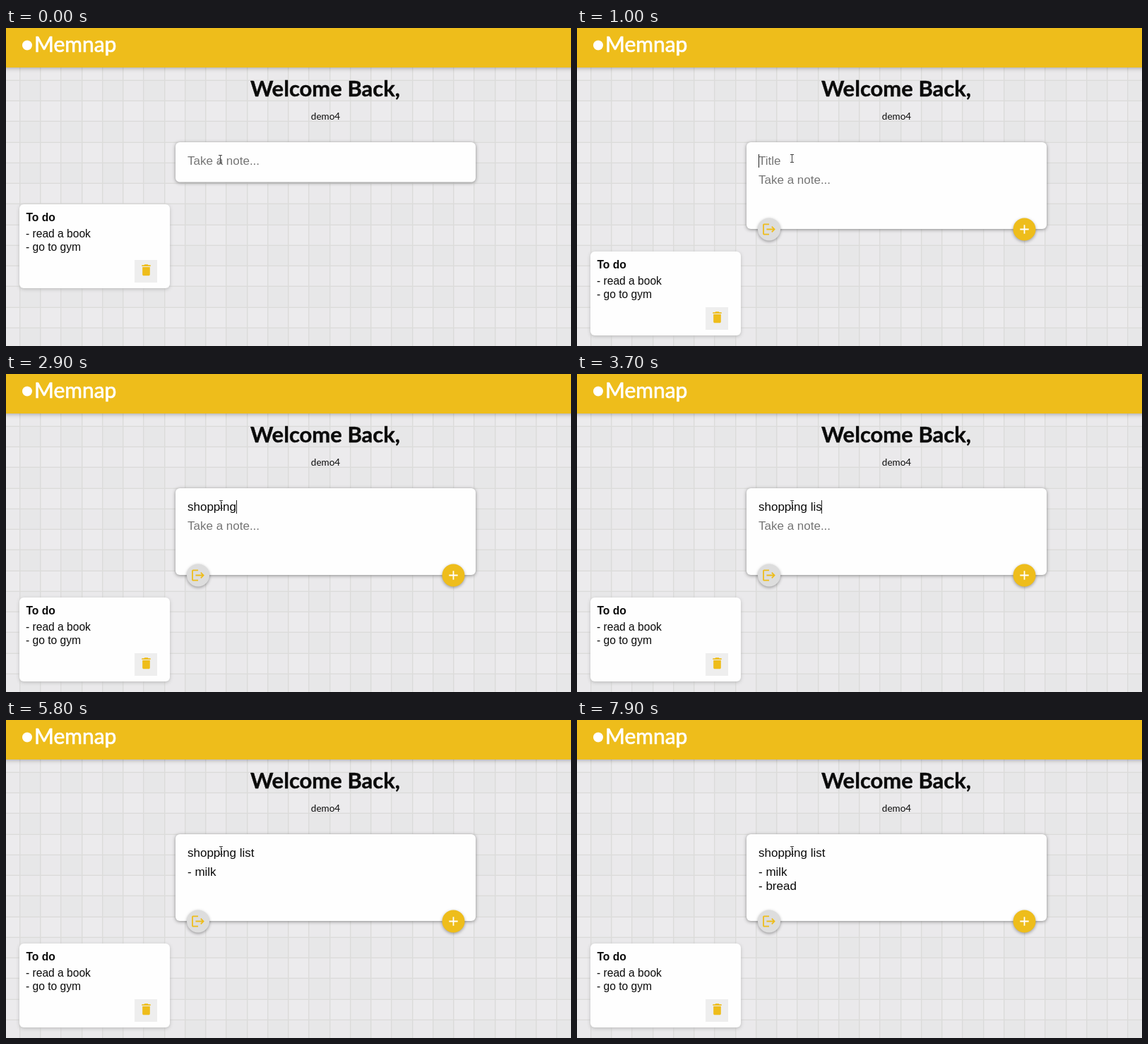
An HTML page with a canvas that plays this animation: 800 px wide and 451 px high, repeating every 8 s.

```html
<!DOCTYPE html>
<html lang="en">
<head>
<meta charset="utf-8">
<title>Notes</title>
<style>
html, body { margin: 0; width: 100%; height: 100%; overflow: hidden; background: #e8e8e9; }
canvas { display: block; width: 800px; height: 451px; }
</style>
</head>
<body>
<canvas id="stage"></canvas>
<script>
const W = 800, H = 451, LOOP = 8000, STEP = 100;
const GOLD = '#eebd1b', INK = '#0b0b0b', HINT = '#757575';
const SANS = '"Liberation Sans", Arial, sans-serif';
const ROUND = 'Lato, "Open Sans", sans-serif';
const FIELD = '17px ' + SANS, NOTE = '15.6px ' + SANS;
const ICON = 0.885;

const icons = {
  bin: new Path2D('M6 19c0 1.1.9 2 2 2h8c1.1 0 2-.9 2-2V7H6v12zM19 4h-3.5l-1-1h-5l-1 1H5v2h14V4z'),
  leave: new Path2D('M17 7l-1.41 1.41L18.17 11H8v2h10.17l-2.58 2.58L17 17l5-5zM4 5h8V3H4c-1.1 0-2 .9-2 2v14c0 1.1.9 2 2 2h8v-2H4V5z'),
  add: new Path2D('M19 13h-6v6h-2v-6H5v-2h6V5h2v6h6v2z')
};

// Times of the key presses, one per character.
const title = { text: 'shopping list',
  keys: [1700, 1900, 2100, 2200, 2400, 2500, 2700, 2900, 3300, 3400, 3600, 3700, 3900] };
const body = { text: '- milk\n- bread',
  keys: [4700, 4800, 4900, 5000, 5100, 5200, 6300, 6500, 6600, 6700, 6800, 7000, 7100, 7300] };
const OPEN = 235, TO_TITLE = 1000, TO_BODY = 4600;

const canvas = document.getElementById('stage');
const ctx = canvas.getContext('2d');
const dpr = window.devicePixelRatio || 1;
canvas.width = Math.round(W * dpr);
canvas.height = Math.round(H * dpr);

function write(text, x, y, font, color, align = 'left') {
  ctx.font = font;
  ctx.fillStyle = color;
  ctx.textAlign = align;
  ctx.fillText(text, x, y);
}

// A thin round outline softens the corners of the letters.
function writeSoft(text, x, y, font, color, align, edge) {
  write(text, x, y, font, color, align);
  ctx.strokeStyle = color;
  ctx.lineWidth = edge;
  ctx.lineJoin = 'round';
  ctx.strokeText(text, x, y);
}

function disc(x, y, r, color) {
  ctx.fillStyle = color;
  ctx.beginPath();
  ctx.arc(x, y, r, 0, 7);
  ctx.fill();
}

function withShadow(dy, blur, color, draw) {
  ctx.save();
  ctx.shadowOffsetY = dy * dpr;
  ctx.shadowBlur = blur * dpr;
  ctx.shadowColor = color;
  draw();
  ctx.restore();
}

function panel(x, y, w, h, dy, shade) {
  withShadow(dy, 5, shade, () => {
    ctx.fillStyle = '#fefefe';
    ctx.beginPath();
    ctx.roundRect(x, y, w, h, 6);
    ctx.fill();
  });
}

function icon(name, x, y, color, scale = 1) {
  ctx.save();
  ctx.translate(x, y);
  ctx.scale(ICON * scale, ICON * scale);
  ctx.translate(-12, -12);
  ctx.fillStyle = color;
  ctx.fill(icons[name]);
  ctx.restore();
}

function paper() {
  const cell = 29.25, x0 = -9.3, y0 = 44.7;
  ctx.fillStyle = '#e7e7e8';
  ctx.fillRect(0, 0, W, H);
  ctx.fillStyle = 'rgba(240,237,241,.34)';
  for (let x = x0; x < W; x += 2 * cell) ctx.fillRect(x, 0, cell, H);
  for (let y = y0; y < H; y += 2 * cell) ctx.fillRect(0, y, W, cell);
  ctx.fillStyle = '#dbdbda';
  for (let x = x0; x < W; x += cell) ctx.fillRect(Math.round(x) - 1, 0, 1.4, H);
  for (let y = y0; y < H; y += cell) ctx.fillRect(0, Math.round(y) - 0.4, W, 1.4);
}

function header() {
  withShadow(0, 7, 'rgba(0,0,0,.4)', () => {
    ctx.fillStyle = GOLD;
    ctx.fillRect(-10, -10, W + 20, 66);
  });
  disc(30, 24.5, 7, '#fff');
  writeSoft('Memnap', 40, 34, '30px ' + ROUND, '#fff', 'left', 0.7);
  writeSoft('Welcome Back,', 452, 97, 'bold 31px ' + ROUND, INK, 'center', 0.4);
  write('demo4', 452.5, 130, '13.5px ' + ROUND, INK, 'center');
}

function savedNote(y) {
  panel(19, y, 213, 119, 1.5, '#bbb');
  write('To do', 28.5, y + 24, 'bold ' + NOTE, INK);
  write('- read a book', 28, y + 47, NOTE, INK);
  write('- go to gym', 28, y + 65.5, NOTE, INK);
  ctx.fillStyle = '#eee';
  ctx.fillRect(182, y + 79, 32, 32);
  icon('bin', 198.5, y + 93.3, GOLD);
}

function fab(x, name, fill, color, scale) {
  if (scale <= 0) return;
  withShadow(1.5, 4, 'rgba(0,0,0,.35)', () => disc(x, 285.5, 16 * scale, fill));
  icon(name, x, 285.5, color, scale);
}

const typed = (field, t) => field.text.slice(0, field.keys.filter(k => k <= t).length);

function caret(t, lines, y) {
  const marks = [OPEN, TO_TITLE, TO_BODY, ...title.keys, ...body.keys];
  const last = Math.max(...marks.filter(m => m <= t));
  if ((t - last) % 1000 >= 500) return;
  ctx.font = FIELD;
  const x = 257 + ctx.measureText(lines[lines.length - 1]).width;
  ctx.fillStyle = '#222';
  ctx.fillRect(Math.floor(x), y + 20 * (lines.length - 1) - 9, 1, 19);
}

function field(lines, hint, y) {
  if (lines.join('') === '') write(hint, 257, y, FIELD, HINT);
  else lines.forEach((line, i) => write(line, 257, y + 20 * i, FIELD, INK));
}

function pointer(x, y) {
  ctx.strokeStyle = '#444';
  ctx.lineWidth = 1;
  ctx.beginPath();
  for (const s of [-1, 1]) {
    ctx.moveTo(x - 2.5, y + 5.5 * s);
    ctx.lineTo(x + 2.5, y + 5.5 * s);
  }
  ctx.moveTo(x, y - 5.5);
  ctx.lineTo(x, y + 5.5);
  ctx.stroke();
}

function zoom(t) {
  const p = Math.min(1, Math.max(0, (t - OPEN) / 225));
  return 1 - Math.pow(1 - p, 1.5);
}

function draw(t) {
  ctx.setTransform(dpr, 0, 0, dpr, 0, 0);
  const open = t >= OPEN;
  paper();
  header();
  savedNote(open ? 317 : 250);
  panel(240, 162, 425, open ? 123 : 56.5, 1, '#888');
  if (open) {
    const head = [typed(title, t)], rows = typed(body, t).split('\n');
    field(head, 'Title', 194);
    field(rows, 'Take a note...', 221);
    if (t >= TO_TITLE && t < TO_BODY) caret(t, head, 188);
    else caret(t, rows, 215);
    fab(272, 'leave', '#ddd', GOLD, zoom(t));
    fab(633.5, 'add', GOLD, '#fff', zoom(t));
  } else {
    write('Take a note...', 257, 194, FIELD, HINT);
  }
  const moved = t >= TO_TITLE;
  pointer(moved ? 304.5 : 303.5, moved ? 185 : 186);
}

const start = performance.now();
function tick() {
  const t = (performance.now() - start) % LOOP;
  draw(Math.floor(t / STEP) * STEP);
  requestAnimationFrame(tick);
}
tick();
</script>
</body>
</html>
```
